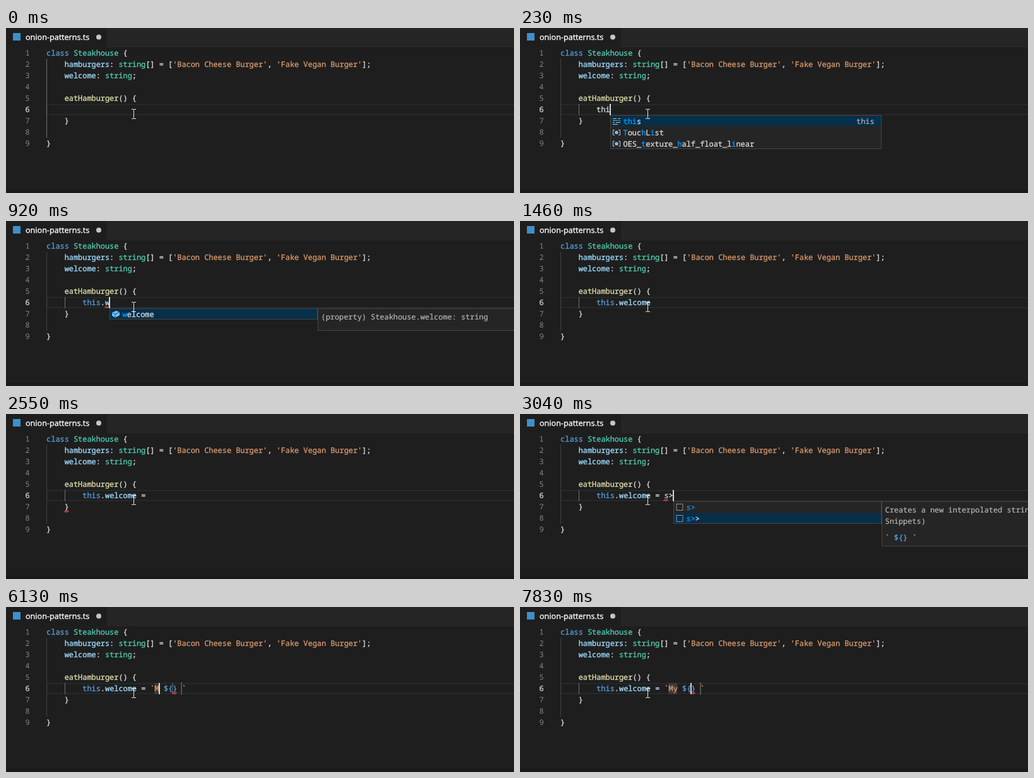
Write an HTML page that moves like this. It is 805 by 263 pixels and loops after 8 s.

```html
<!DOCTYPE html>
<html lang="en">
<head>
<meta charset="utf-8">
<title>Typing a snippet</title>
<style>
  html, body { margin: 0; height: 100%; overflow: hidden; background: #1e1e1e; }
  svg { display: block; width: 100vw; height: 100vh; }
  text { font: 11.91px "Noto Sans Mono", "DejaVu Sans Mono", monospace; white-space: pre; text-rendering: geometricPrecision; }
  text, tspan { fill: currentColor; stroke: currentColor; stroke-width: .35px; }
  .tab { font: 12.6px "Open Sans", "Noto Sans", sans-serif; color: #fff; }
  .k { color: #569cd6; } .t { color: #4ec9b0; } .v { color: #9cdcfe; }
  .s { color: #d6976a; } .f { color: #dcdcaa; } .d { color: #d8d8d8; }
  .n { color: #858585; stroke: none; } .a { color: #d0d0d0; } .g { color: #b8b8b8; stroke-width: .2px; }
  .h { color: #0097fb; }
</style>
</head>
<body>
<svg id="stage" viewBox="0 0 805 263"></svg>
<script>
const LOOP = 8000, CHAR = 7.147, LEFT = 63.55, ROW = 18, TOP = 31;
const colX = c => LEFT + c * CHAR;
const textX = c => colX(c) + .55;
const lineY = n => TOP + (n - 1) * ROW;

const rect = (x, y, w, h, fill, extra = '') =>
  `<rect x="${x}" y="${y}" width="${w}" height="${h}" fill="${fill}" ${extra}/>`;
const path = (d, stroke, fill = 'none', width = 1) =>
  `<path d="${d}" stroke="${stroke}" fill="${fill}" stroke-width="${width}"/>`;
// Segments are split by "|"; the first letter of each is its colour class.
const code = (x, y, s) => `<text x="${x}" y="${y}">` + s.split('|').map(p =>
  `<tspan class="${p[0]}">${p.slice(1)}</tspan>`).join('') + '</text>';
const panel = (x, w, h) =>
  rect(x + .5, 139.5, w - 1, h - 1, '#252526', 'stroke="#454545"');

const lines = [
  'kclass |tSteakhouse |d{',
  "v    hamburgers|d: |tstring|d[] = [|s'Bacon Cheese Burger'|d, |s'Fake Vegan Burger'|d];",
  'v    welcome|d: |tstring|d;',
  '', 'f    eatHamburger|d() {', '', 'd    }', '', 'd}'
];

const icons = {
  word: (x, y) => path(`M${x} ${y + 1.5}h6m2 0h4M${x} ${y + 7.5}h3m2 0h7M${x} ${y + 10.5}h8`, '#c5c5c5') +
    path(`M${x} ${y + 4.5}h8m1 0h3`, '#d08a6a'),
  type: (x, y) => path(`M${x + 3} ${y + 1.5}h-2.5v8h2.5m6 0h2.5v-8h-2.5`, '#c5c5c5') +
    `<circle cx="${x + 6}" cy="${y + 5.5}" r="2.8" fill="#75beff"/>`,
  field: (x, y) => path(`M${x} ${y + 3}l7-3 5 2.5v5l-7 3.5-5-3z`, 'none', '#75beff') +
    path(`M${x + 1} ${y + 3.5}l4 2 6-3M${x + 5} ${y + 5.5}v5`, '#1c5180'),
  snippet: (x, y) => rect(x + 1, y + .5, 10, 10, 'none', 'stroke="#c5c5c5" stroke-dasharray="2 1"')
};

// Highlights the letters of the query in order of appearance.
function match(label, query) {
  let i = 0;
  return [...label].map(ch => {
    const hit = i < query.length && ch.toLowerCase() === query[i];
    if (hit) i++;
    return (hit ? 'h' : 'd') + ch;
  }).join('|');
}

function popup(x, { query, items, pick = 0, hint, info }) {
  const w = info ? 330 : 430, h = items.length * ROW;
  let out = panel(x, w, h);
  items.forEach(([icon, label], i) => {
    const y = 139 + i * ROW;
    if (i === pick) out += rect(x + 1, y + 1, w - 2, ROW - 2, '#062f4a');
    out += icons[icon](x + 4, y + 4) + code(x + 20.5, y + 14, match(label, query));
  });
  if (hint) out += code(x + 390, 153, 'g' + hint);
  if (info) {
    out += panel(x + w, 500, info.h);
    info.rows.forEach(([y, s]) => out += code(x + w + 5.5, y, s));
  }
  return out;
}

const squiggle = (col, line) =>
  path(`M${Math.floor(colX(col)) + .5} ${lineY(line) + 17.5}l2-2 2 2 2-2 1 1`, '#f44040', 'none', 1.4);

const words = (kind, list) => list.split(' ').map(s => [kind, s]);
const snippetInfo = { h: 72, rows: [
  [157, 'gCreates a new interpolated string'], [175, 'gSnippets)'], [201, 's`|k ${}|s `']
] };
const menus = {
  th: { query: 'th', hint: 'this', items: [...words('word', 'this throw'),
    ...words('type', 'Path2D matchMedia Touch TouchEvent TouchList')] },
  thi: { query: 'thi', hint: 'this', items: [...words('word', 'this'),
    ...words('type', 'TouchList OES_texture_half_float_linear')] },
  this: { query: 'this', hint: 'this', items: [['word', 'this'], ['type', 'TouchList']] },
  w: { query: 'w', items: [['field', 'welcome']],
    info: { h: 36, rows: [[157, 'g(property) Steakhouse.welcome: string']] } },
  s: { query: 's', pick: 1, info: snippetInfo, items: [...words('snippet', 's> s>>'),
    ...words('type', 'scroll scrollBy scrollTo self Selection')] },
  arrow: { query: 's>', pick: 1, info: snippetInfo, items: words('snippet', 's> s>>') }
};

const member = 'kthis|d.|vwelcome';
const filled = m => ({ text: `${member}|d = |s\`${m} |k\${}|s \``, typed: m, at: 24 + m.length });

// Each step changes the state left by the one before it.
const steps = [
  [0, { text: '', at: 8, caret: 0 }],
  [80, { text: 'dt', at: 9, caret: 1 }],
  [150, { text: 'dth', at: 10, menu: 'th' }],
  [230, { text: 'dthi', at: 11, menu: 'thi' }],
  [310, { text: 'kthis', at: 12, menu: 'this' }],
  [380, { menu: '' }],
  [460, { text: 'kthis|d.', at: 13 }],
  [920, { text: 'kthis|d.|vw', at: 14, menu: 'w', error: [13, 6] }],
  [1000, { text: member, at: 20, menu: '' }],
  [1380, { error: null }],
  [1460, { caret: 0 }],
  [1840, { at: 21, caret: 1 }],
  [2010, { text: member + '|d =', at: 22 }],
  [2080, { at: 23 }],
  [2400, { error: [4, 7] }],
  [2550, { caret: 0 }],
  [2720, { text: member + '|d = |vs', at: 24, caret: 1, menu: 's' }],
  [3040, { text: member + '|d = |vs|d>', at: 25, menu: 'arrow', error: [23, 6] }],
  [3340, { ...filled(''), menu: '', error: null }],
  [3420, { error: [4, 7] }],
  [3730, { error: [27, 6] }],
  [3810, { caret: 0 }],
  [4340, { caret: 1 }],
  [4800, { caret: 0 }],
  [5260, { caret: 1 }],
  [5810, { caret: 0 }],
  [6130, { ...filled('M'), caret: 1, error: [28, 6] }],
  [6590, { ...filled('My'), error: [29, 6] }],
  [6820, { at: 29 }],
  [7280, { caret: 0 }],
  [7830, { caret: 1 }]
];

function tabStops(typed) {
  const n = typed.length, x = c => Math.floor(colX(c));
  return rect(x(24), 121, Math.max(2, n * CHAR), ROW, '#3a3a3a') +
    rect(x(27 + n), 121, 2, ROW, '#484848') +
    rect(x(29 + n), 120, 2, ROW + 2, '#525252');
}

function draw(s) {
  let out = rect(0, 0, 805, 263, '#1e1e1e') + rect(160, 0, 645, TOP, '#252526') +
    rect(11, 8, 12, 12, '#3f8fc9') +
    '<text class="tab" x="31" y="19">onion-patterns.ts</text>' +
    '<circle cx="147" cy="14.5" r="4" fill="#c5c5c5"/>' +
    rect(0, 258, 805, 5, '#1a1a1a') +
    rect(65, 122, 760, 16, 'none', 'stroke="#282828" stroke-width="2"') +
    rect(64, 49, 1, 126, s.text ? '#404040' : '#707070');
  if (s.text) out += rect(93, 121, 1, ROW, '#707070');
  if (s.typed !== undefined) out += tabStops(s.typed);
  lines.forEach((line, i) => {
    const y = lineY(i + 1) + 13;
    out += code(30.5, y, (i === 5 ? 'a' : 'n') + (i + 1));
    if (line) out += code(textX(0), y, line);
  });
  if (s.text) out += code(textX(8), 134, s.text);
  if (s.error) out += squiggle(...s.error);
  const x = Math.floor(colX(s.at));
  if (s.caret) out += rect(x, 121, 2, ROW, '#d4d4d4');
  if (s.menu) out += popup(x + 1, menus[s.menu]);
  return out + path('M199 129.5h3l.5 1 .5-1h3M202.5 130v14M199 144.5h3l.5-1 .5 1h3', '#e8e8e8');
}

const stage = document.getElementById('stage');
let shown = -1;
function tick() {
  const t = performance.now() % LOOP;
  const past = steps.filter(([start]) => start <= t);
  if (past.length !== shown) {
    shown = past.length;
    stage.innerHTML = draw(Object.assign({}, ...past.map(p => p[1])));
  }
  requestAnimationFrame(tick);
}
tick();
</script>
</body>
</html>
```
